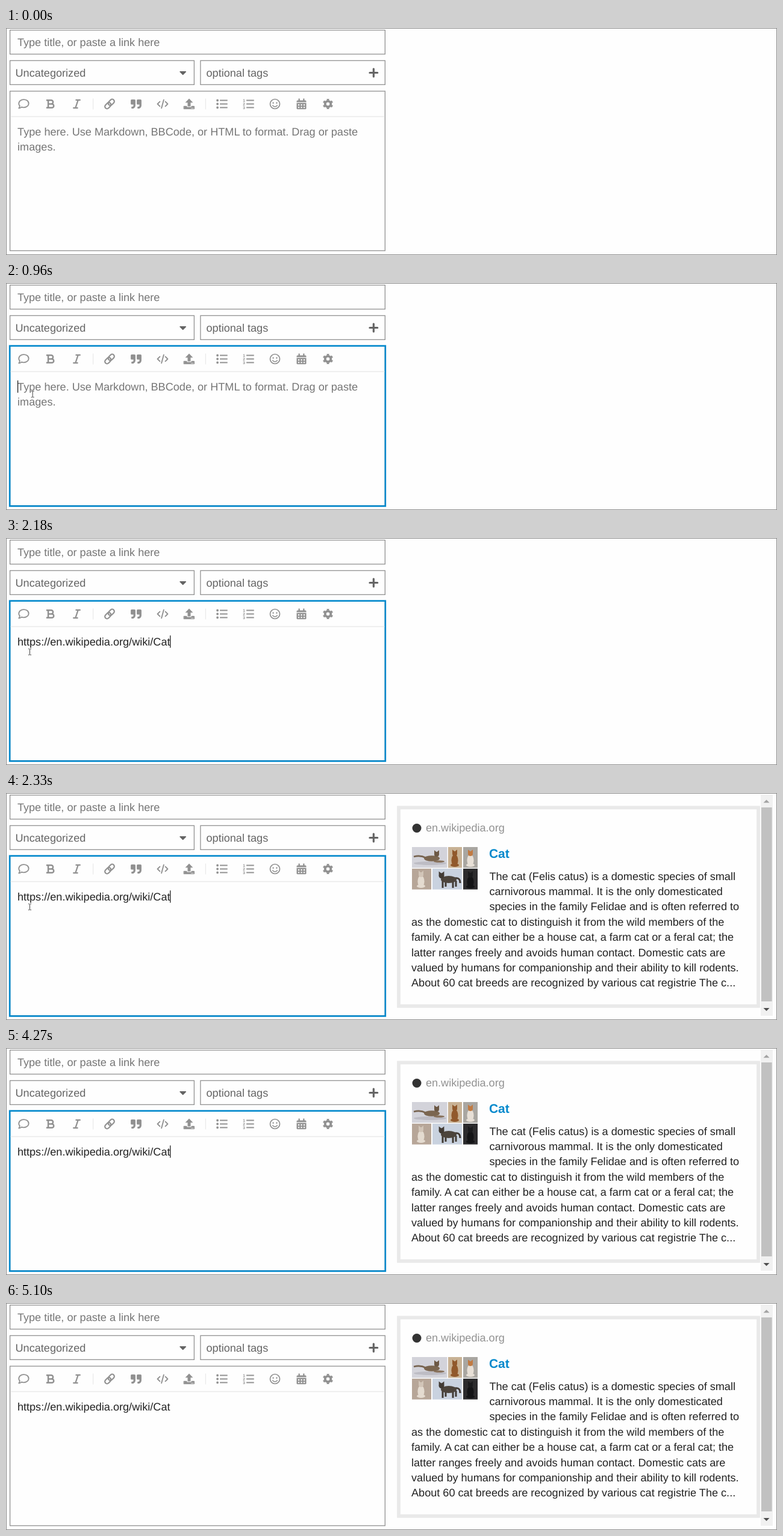
Write an HTML page that moves like this. It is 1280 px wide and 378 px high and loops after 5.22 s.

```html
<!DOCTYPE html>
<html lang="en">
<head>
<meta charset="utf-8">
<title>Link preview in an editor</title>
<style>
  html, body { margin: 0; width: 100%; height: 100%; overflow: hidden; background: #fefefe; }
  svg { display: block; width: 100%; height: 100%; }
  text { font: 18.13px "Liberation Sans", Arial, sans-serif; text-rendering: geometricPrecision; fill: #222; white-space: pre; }
  .hint { fill: #757575; }
  .label { fill: #646464; }
  .muted { fill: #919191; }
  .heading { font-weight: bold; font-size: 20.9px; fill: #08c; }
  .digit { font-size: 6.6px; font-weight: bold; fill: #919191; }
  .box { fill: none; stroke: #919191; stroke-width: 1.3; }
  .rule { fill: none; stroke: #e9e9e9; stroke-width: 1.3; }
  .line { fill: none; stroke: #919191; stroke-width: 2.2; }
  .solid { fill: #919191; }
  .hole { fill: #fefefe; }
  .round { stroke-linecap: round; stroke-linejoin: round; }
</style>
</head>
<body>
<svg viewBox="0 0 1280 378">
  <rect x=".5" y=".5" width="1279" height="377" fill="#fefefe" stroke="#8a8a8a"/>

  <!-- Title, category and tags -->
  <rect class="box" x="6.6" y="3.5" width="622.7" height="40"/>
  <text class="hint" x="18.9" y="29.9">Type title, or paste a link here</text>
  <rect class="box" x="6.6" y="54.3" width="305.8" height="40"/>
  <text class="label" x="15.5" y="80.6">Uncategorized</text>
  <path class="round" d="M289 72.7h9.4l-4.7 4.8z" fill="#646464" stroke="#646464" stroke-width="1.4"/>
  <rect class="box" x="322.9" y="54.3" width="306.4" height="40"/>
  <text class="label" x="332.5" y="80.6">optional tags</text>
  <path class="round" d="M603.9 74.5h12.8M610.3 68.1v12.8" stroke="#646464" stroke-width="3.2"/>

  <!-- Editor -->
  <rect class="box" x="6.6" y="105.2" width="622.7" height="265.6"/>
  <rect id="focus" x="6.2" y="104.7" width="623.6" height="266.8" fill="none" stroke="#08c" stroke-width="2.6"/>
  <path class="rule" d="M7.6 147.5H628.4M144.6 117.5v18M331.4 117.5v18"/>

  <g transform="translate(29.5 126.5)">
    <path class="line" stroke-linejoin="round" style="stroke-width:1.8" d="M-6.6 3.1A8.2 6.6 0 1 1-3.6 5.1Q-5.5 7-8.2 7Q-7 5.5-6.6 3.1Z"/>
  </g>
  <g transform="translate(73.5 126.5)">
    <path class="line" style="stroke-width:2.5" d="M-6.6-6.3H1.5a3 3 0 0 1 0 6.2H-3M1.5 0H2.6a3.1 3.1 0 0 1 0 6.3H-6.6M-3.4-6.3V6.3"/>
  </g>
  <g transform="translate(117.5 126.5)">
    <path class="line" d="M-2-6.6H6.2M-6.2 6.6H2M2.2-6.6L-2.2 6.6"/>
  </g>
  <g transform="translate(172 126.5) rotate(-45)">
    <rect class="line" x="-9.6" y="-3.6" width="11.4" height="7.2" rx="3.6"/>
    <rect class="line" x="-1.8" y="-3.6" width="11.4" height="7.2" rx="3.6"/>
  </g>
  <g transform="translate(216 126.5)">
    <path id="quote" class="solid" d="M-7.3-7.5h4.6a1.6 1.6 0 0 1 1.6 1.6V2.5a5.3 5.2 0 0 1-5.3 5.2h-.6a.8.8 0 0 1-.8-.8V5.3a.8.8 0 0 1 .8-.8h.6a2 2 0 0 0 2-2V1h-2.9a1.6 1.6 0 0 1-1.6-1.6V-5.9a1.6 1.6 0 0 1 1.6-1.6z"/>
    <use href="#quote" x="10"/>
  </g>
  <g transform="translate(260 126.5)">
    <path class="line round" style="stroke-width:1.9" d="M-4.6-3.9L-8.4 0l3.8 3.9M4.6-3.9L8.4 0l-3.8 3.9M1.9-6.9L-1.9 6.9"/>
  </g>
  <g transform="translate(304 126.5)">
    <path class="solid" d="M-2.5 4V-2.2H-6.4L0-9L6.4-2.2H2.5V4Z"/>
    <path class="solid round" stroke="#919191" d="M-8.5 3.8h4.5v1.8h8v-1.8h4.5v4.4h-17z"/>
    <circle class="hole" cx="4" cy="7" r=".7"/><circle class="hole" cx="6.4" cy="7" r=".7"/>
  </g>
  <g transform="translate(358.5 126.5)">
    <path id="bars" class="line" d="M-3.4-6H9.2M-3.4 0H9.2M-3.4 6H9.2"/>
    <path class="line" style="stroke-width:3.8" stroke-linecap="round" d="M-7.4-6h.01M-7.4 0h.01M-7.4 6h.01"/>
  </g>
  <g transform="translate(402.5 126.5)">
    <use href="#bars"/>
    <text class="digit" x="-9.2" y="-3.6">1</text><text class="digit" x="-9.2" y="2.4">2</text><text class="digit" x="-9.2" y="8.4">3</text>
  </g>
  <g transform="translate(446.5 126.5)">
    <circle class="line" style="stroke-width:1.7" r="8"/>
    <circle class="solid" cx="-2.9" cy="-1.8" r="1.2"/><circle class="solid" cx="2.9" cy="-1.8" r="1.2"/>
    <path class="line round" style="stroke-width:1.6" d="M-3.9 2.5Q0 6.6 3.9 2.5"/>
  </g>
  <g transform="translate(490.5 126.5)">
    <path class="solid" d="M-5-9h2.3v3h5.4v-3h2.3v3h1.4a1.6 1.6 0 0 1 1.6 1.6V-2.9H-8V-4.4a1.6 1.6 0 0 1 1.6-1.6H-5zM-8-1.7H8V7.2a1.6 1.6 0 0 1-1.6 1.6H-6.4a1.6 1.6 0 0 1-1.6-1.6z"/>
    <path stroke="#fefefe" stroke-width="2.1" stroke-dasharray="2.3 2.2" d="M-5.6 1.6H5.8M-5.6 5.7H5.8"/>
  </g>
  <g transform="translate(534.5 126.5)">
    <circle class="line" style="stroke-width:3.8" r="4.7"/>
    <circle class="line" style="stroke-width:2.6" r="7.3" pathLength="12" stroke-dasharray="1 1" stroke-dashoffset="-.5"/>
  </g>

  <g id="placeholder">
    <text class="hint" x="19.1" y="178.9">Type here. Use Markdown, BBCode, or HTML to format. Drag or paste</text>
    <text class="hint" x="19.1" y="204.3">images.</text>
  </g>
  <text id="address" x="18.9" y="178.9">https://en.wikipedia.org/wiki/Cat</text>
  <rect id="caret" y="162.3" width="1.2" height="20.4" fill="#111"/>

  <!-- Preview -->
  <g id="preview">
    <rect x="652" y="24.4" width="597" height="330.4" fill="#fefefe" stroke="#e9e9e9" stroke-width="5.8"/>
    <circle cx="682" cy="58.5" r="7.5" fill="#333"/>
    <text class="muted" x="696.9" y="64.4">en.wikipedia.org</text>
    <g id="photos"></g>
    <text class="heading" x="802" y="107.9">Cat</text>
    <g id="summary"></g>
    <rect x="1253" y="3" width="20" height="368" fill="#f1f1f1"/>
    <rect x="1254" y="24" width="17.6" height="323" fill="#c1c1c1"/>
    <path d="M1257.5 16.3h10l-5-5z" fill="#a3a3a3"/>
    <path d="M1257.5 358h10l-5 5z" fill="#505050"/>
  </g>

  <path id="pointer" fill="none" stroke="#444" stroke-width="1" d="M-2.5-5H-.8L0-4.4L.8-5H2.5M0-4.4V4.4M-2.5 5H-.8L0 4.4L.8 5H2.5"/>
</svg>
<script>
const LOOP = 5220;
const $ = id => document.getElementById(id);

const summary = [
  "The cat (Felis catus) is a domestic species of small",
  "carnivorous mammal. It is the only domesticated",
  "species in the family Felidae and is often referred to",
  "as the domestic cat to distinguish it from the wild members of the",
  "family. A cat can either be a house cat, a farm cat or a feral cat; the",
  "latter ranges freely and avoids human contact. Domestic cats are",
  "valued by humans for companionship and their ability to kill rodents.",
  "About 60 cat breeds are recognized by various cat registrie The c..."
];
$("summary").innerHTML = summary.map((line, i) =>
  `<text x="${i < 3 ? 802.4 : 673}" y="${144.5 + i * 25.42}">${line}</text>`).join("");

const tile = (x, y, w, color) => `<rect x="${x}" y="${y}" width="${w}" height="34.6" fill="${color}"/>`;
const blob = (x, y, rx, ry, color) => `<ellipse cx="${x}" cy="${y}" rx="${rx}" ry="${ry}" fill="${color}"/>`;
const head = (x, y, r, color) => blob(x, y, r, r, color) +
  `<path d="M${x - r} ${y}v${-r * 1.7}l${r} ${r * .8}l${r} ${-r * .8}v${r * 1.7}z" fill="${color}"/>`;
const sitting = (x, y, color, face = color) =>
  blob(x, y + 11, 5.6, 9.5, color) + blob(x, y + 19, 7, 3, color) + head(x, y, 4, face);

$("photos").innerHTML =
  tile(674, 90, 58.5, "#d3d3da") + blob(704, 117, 27, 3, "#bdbcc4") +
  `<path d="M697 108Q688 103 677 106" stroke="#77634f" stroke-width="2.6" fill="none"/>` +
  blob(707, 109, 13, 4.8, "#7b6650") + blob(719, 114, 9, 1.8, "#87705a") + head(715, 102, 4, "#6c5844") +
  tile(734, 90, 23, "#c8b295") + sitting(745, 101, "#91592c") +
  tile(759, 90, 24, "#a9a6a1") + sitting(771, 101, "#e7dfd6", "#c17a42") +
  tile(674, 126, 32, "#b7a698") + sitting(689, 136, "#e4dbd0", "#d2c5b8") +
  tile(708, 126, 49, "#c9d2df") +
  `<path d="M745 142Q754 140 754 150M725 147v11M730 147v9M742 147v11M747 146v10" stroke="#413a34" stroke-width="3" fill="none"/>` +
  blob(735, 144, 13, 6, "#4c443c") + head(723, 138, 4.4, "#413a34") +
  tile(759, 126, 24, "#2c2b2d") + sitting(771, 137, "#141416", "#1b1b1d");

// Pointer stops: [start time, x, y]; no position means hidden.
const pointerStops = [
  [0], [280, 61.5, 372.5], [400, 57, 300], [530, 47, 235], [650, 44.2, 185.2],
  [1330, 44.5, 185.6], [1480, 41.5, 187.8], [1630, 39.5, 188.5], [1910, 39.5, 189.7],
  [3640, 39, 199], [3770, 37.5, 215.5], [3890]
];
const within = (t, ...spans) => spans.some(([from, to]) => t >= from && t < to);
const show = (id, visible) => $(id).setAttribute("visibility", visible ? "visible" : "hidden");

function draw(t) {
  const pasted = t >= 2180;
  show("focus", within(t, [960, 5100]));
  show("placeholder", !pasted);
  show("address", pasted);
  show("preview", t >= 2330);
  show("caret", within(t, [960, 1480], [2060, 2710], [3240, 3770], [4270, 4840]));
  $("caret").setAttribute("x", pasted ? 272.2 : 19);

  const [, x, y] = pointerStops.findLast(([start]) => t >= start);
  show("pointer", x !== undefined);
  if (x !== undefined) $("pointer").setAttribute("transform", `translate(${x} ${y})`);
}

const began = performance.now();
function tick() {
  draw((performance.now() - began) % LOOP);
  requestAnimationFrame(tick);
}
tick();
</script>
</body>
</html>
```
